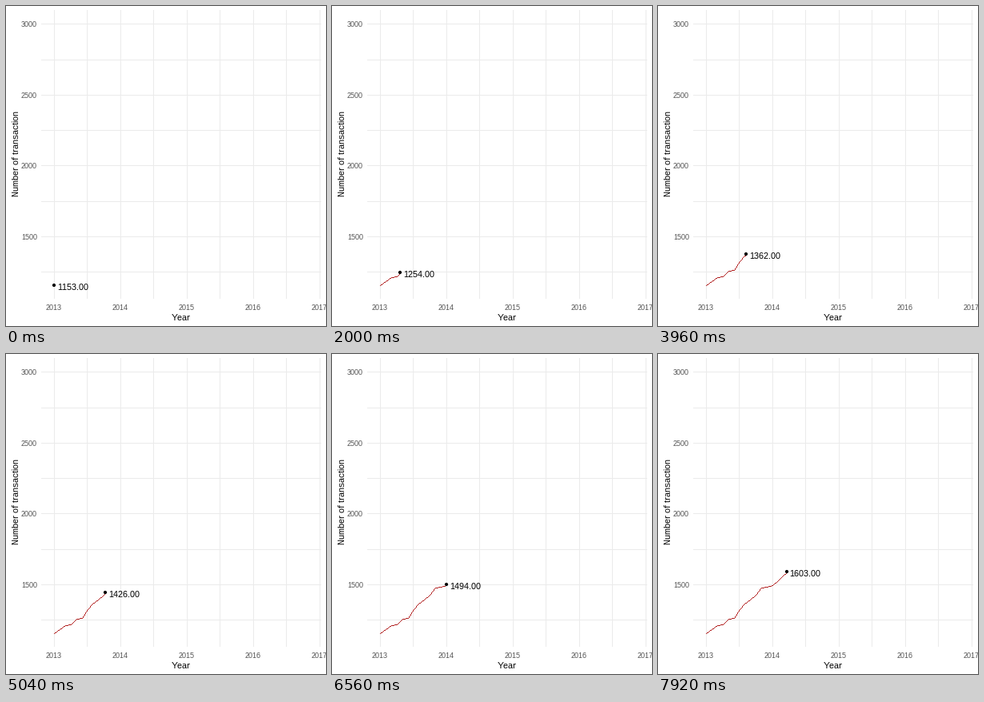
Recreate the animation shown at these times as a matplotlib script. Size 400 px wide and 400 px high, loop 8 s.

```python
import numpy as np
import matplotlib.pyplot as plt
from matplotlib.animation import FuncAnimation
from matplotlib.collections import PolyCollection
from matplotlib.patches import Circle, Rectangle

plt.rcParams.update({
    "font.family": "Liberation Sans",
    "text.hinting": "native",
    "text.hinting_factor": 1,
    "text.kerning_factor": 6,
})

SIZE, DPI = 400, 72    # at 72 dpi one point is one pixel
FRAMES, INTERVAL = 200, 40
LEFT, RIGHT, TOP, BOTTOM = 44, 394, 5, 366
YEAR_PX = 83
STEP = 0.5077          # pixels the reveal advances per frame
GRID, TICK = "#EBEBEB", "#4D4D4D"

# turning points of the monthly series: month -> total
KEYS = {0: 1153, 2: 1209, 3: 1219, 4: 1254, 5: 1262, 6: 1324, 7: 1362,
        9: 1426, 10: 1475, 12: 1494, 15: 1603}


def x_of(month):
    return 60 + YEAR_PX * month / 12


def y_of(total):
    return 288.4 - (total - 1500) * 0.1771


months = np.arange(16)
totals = np.interp(months, list(KEYS), list(KEYS.values())).round()
month_x, month_y = x_of(months), y_of(totals)

fig = plt.figure(figsize=(SIZE / DPI, SIZE / DPI), dpi=DPI, facecolor="white")
ax = fig.add_axes([0, 0, 1, 1])
ax.set_xlim(0, SIZE)
ax.set_ylim(SIZE, 0)
ax.axis("off")


def bar(x, y, w, h):
    ax.add_patch(Rectangle((x, y), w, h, facecolor=GRID, linewidth=0, zorder=1))


def label(x, y, s, px=11, color="black", **kw):
    return ax.text(x, y, s, fontsize=px, color=color, va="baseline",
                   zorder=4, **kw)


def draw_axes():
    for half in range(9):
        x = int(x_of(6 * half))
        bar(x, TOP, 1, BOTTOM - TOP)
        if half % 2 == 0:
            label(x - 10, 380, str(2013 + half // 2), 9, TICK)
    for total in range(1250, 3001, 250):
        y = int(y_of(total))
        bar(LEFT, y, RIGHT - LEFT, 1)
        if total % 500 == 0:
            label(19, y + 4, str(total), 9, TICK)
    label(207, 393, "Year")
    label(16, 185, "Number of transaction", rotation=90,
          rotation_mode="anchor", ha="center")


def pixel_path(xs, ys):
    """Pixels of a one-pixel polyline, stepping along the longer side."""
    pts = np.column_stack([np.round(xs), np.floor(ys)])
    runs = [pts[:1]]
    for a, b in zip(pts, pts[1:]):
        n = int(np.abs(b - a).max())
        runs.append(np.floor(np.linspace(a, b, n + 1) + 0.5))
    return np.concatenate(runs)


draw_axes()
SQUARE = np.array([(0, 0), (1, 0), (1, 1), (0, 1)])
line = ax.add_collection(
    PolyCollection([], facecolors="firebrick", linewidths=0, zorder=2),
    autolim=False)
dot = ax.add_patch(Circle((0, 0), 2.1, facecolor="black", linewidth=0, zorder=3))
value = label(0, 0, "")


def update(i):
    x = 60 + STEP * min(i, FRAMES - 2)
    y = np.interp(x, month_x, month_y)
    past = month_x < x
    path = pixel_path(np.append(month_x[past], x), np.append(month_y[past], y))
    line.set_verts(path[:, None, :] + SQUARE if i else [])

    dot.center = round(x), np.floor(y - 0.4)

    nearest = np.argmin(np.abs(month_x - x))
    value.set_text(f"{totals[nearest]:.2f}")
    value.set_position((round(x + 3.8), round(y + 0.7) + 4))
    return line, dot, value


anim = FuncAnimation(fig, update, frames=FRAMES, interval=INTERVAL,
                     repeat=True, repeat_delay=0, blit=False)
plt.show()
```
